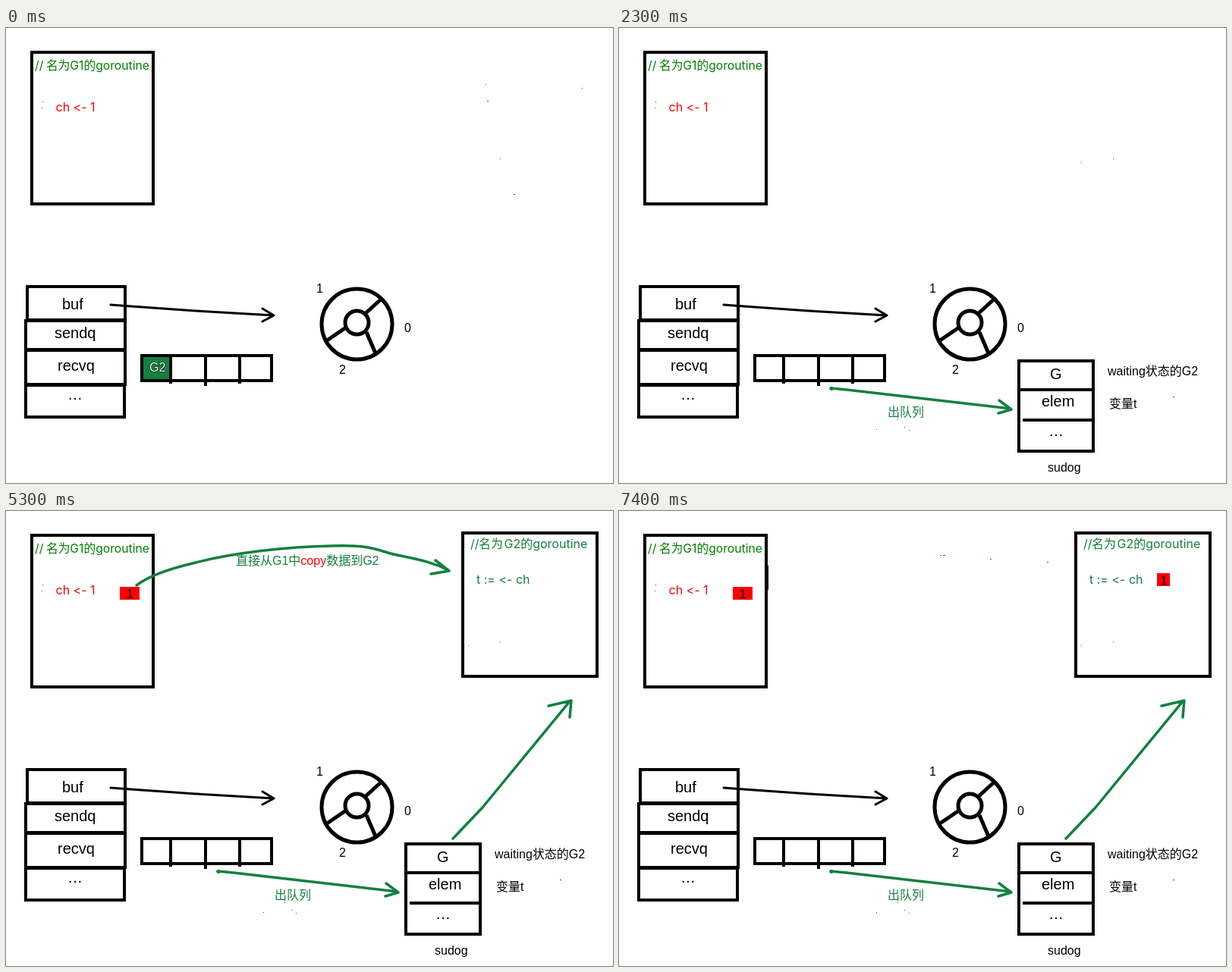
An HTML page for the animation above (8 s loop, 800x600 px).

```html
<!DOCTYPE html>
<html lang="zh">
<head>
<meta charset="utf-8">
<title>Channel send</title>
<style>
  html, body { margin: 0; width: 100%; height: 100%; overflow: hidden; background: #fff; }
  svg { display: block; width: 100%; height: 100%; }
  text { font: 16px "Liberation Sans", "Noto Sans CJK SC", "Noto Sans CJK", sans-serif; white-space: pre; }
  .big { font-size: 20px; }
  .code { font-family: Inter, "Noto Sans CJK SC", "Noto Sans CJK", sans-serif; font-feature-settings: "calt" 0; }
  .line { fill: none; stroke: #000; stroke-width: 4; }
  .pen { fill: none; stroke-width: 3.5; stroke-linecap: round; stroke-linejoin: round; }
  .speck { fill: none; stroke: #444; stroke-width: 1; }
  .green { fill: #13803f; }
  .pen.green { fill: none; stroke: #13803f; }
  .red { fill: #f00; }
  .comment { fill: #008000; }
</style>
</head>
<body>
<svg viewBox="0 0 800 600">
  <!-- sender -->
  <path class="line" d="M34 32H194V232H34Z"/>
  <text class="code comment" x="38" y="55" style="font-size:15.7px">//<tspan x="53">名为G1的goroutine</tspan></text>
  <text class="code red" x="65.5" y="110">ch &lt;- 1</text>

  <!-- channel -->
  <path class="line" d="M28 341H157V385H28ZM26 386H157V424H26ZM26 425H157V470H26ZM26 471H156V513H26Z"/>
  <g class="big">
    <text class="big" x="74" y="371">buf</text>
    <text class="big" x="64" y="409">sendq</text>
    <text class="big" x="68" y="452">recvq</text>
    <text class="big" x="81" y="490">…</text>
  </g>
  <path class="pen" stroke="#000" style="stroke-width:3" d="M138 365L165 367L250 373L353 379M338 370L353 379L338 387"/>

  <!-- ring buffer -->
  <g class="line" style="stroke-width:5">
    <circle cx="462.5" cy="390.5" r="46.5"/>
    <circle cx="462.5" cy="388.5" r="15.5"/>
    <path d="M473 377L495 357M448 395L423 412M475 401L487 429"/>
  </g>
  <text x="409" y="349">1</text>
  <text x="525" y="401">0</text>
  <text x="439" y="456">2</text>

  <!-- receive queue -->
  <path class="green" data-to="500" d="M179 432H217V465H179Z"/>
  <path class="line" d="M179 432H350V465H179ZM217 432V469M263 432V472M308 432V469"/>
  <text data-to="500" x="189" y="453" fill="#fff" stroke="#000" paint-order="stroke">G2</text>

  <!-- dequeued waiter -->
  <g data-from="500">
    <path class="pen green" d="M279 475L300 477L516 502M501 491L517 503L500 508"/>
    <circle class="green" cx="280" cy="475.5" r="2.5"/>
    <text class="green" x="354" y="512">出队列</text>
    <path class="line" d="M527 439H625V558H527ZM527 477H625M532 517H625"/>
    <text class="big" x="568" y="463">G</text>
    <text class="big" x="557" y="499">elem</text>
    <text class="big" x="566" y="538">…</text>
    <text x="565" y="585">sudog</text>
    <text x="644" y="458">waiting状态的G2</text>
    <text x="646" y="501">变量t</text>
  </g>

  <!-- receiver -->
  <g data-from="3500">
    <path class="pen green" d="M589 432L628 391L743 251M715 257L745 250L743 272"/>
    <path class="line" d="M602 29H779V218H602Z"/>
    <text class="code green" x="612" y="49">//<tspan x="623">名为</tspan><tspan x="656.5">G2的goroutine</tspan></text>
    <text class="code green" x="620" y="96">t := &lt;- ch</text>
    <path class="red" d="M150 100H176V117H150Z"/>
    <text x="159" y="115">1</text>
  </g>
  <g data-from="3500" data-to="6500">
    <path class="pen green" d="M172 98C190 84 220 75 250 68C300 55 370 47 430 46C490 44 490 54 520 59C550 65 565 69 583 78M566 65L584 79L560 83"/>
    <text class="green" x="303" y="71">直接从G1中<tspan class="red">copy</tspan>数据到G2</text>
  </g>
  <g data-from="6500">
    <path class="red" d="M709 82H726V99H709Z"/>
    <text x="713.5" y="97">1</text>
    <path class="line" style="stroke-width:2" d="M196 72V104"/>
    <path class="speck" style="stroke:#13803f" d="M423 58.5h2m2 0h3M489 63.5h2M564 67.5h2"/>
  </g>

  <!-- stray pen dots -->
  <path class="speck" d="M47 105.5h1M48 97.5h1M651 172.5h1"/>
  <path class="speck" data-to="500" d="M634 96.5h2M669 219.5h2M632 74.5h1M759 79.5h1M272 466.5h2"/>
  <path class="speck" data-from="500" d="M609 177.5h1M339 529.5h1M367 516.5h1M376 526.5h1M382 530.5h1M730 486.5h2"/>
</svg>
<script>
  const LOOP = 8000;
  const parts = [...document.querySelectorAll("[data-from], [data-to]")];

  function draw(now) {
    const t = now % LOOP;
    for (const part of parts) {
      const { from = 0, to = LOOP } = part.dataset;
      part.style.display = t >= +from && t < +to ? "" : "none";
    }
  }

  const start = performance.now();
  function tick() {
    draw(performance.now() - start);
    requestAnimationFrame(tick);
  }
  tick();
</script>
</body>
</html>
```
